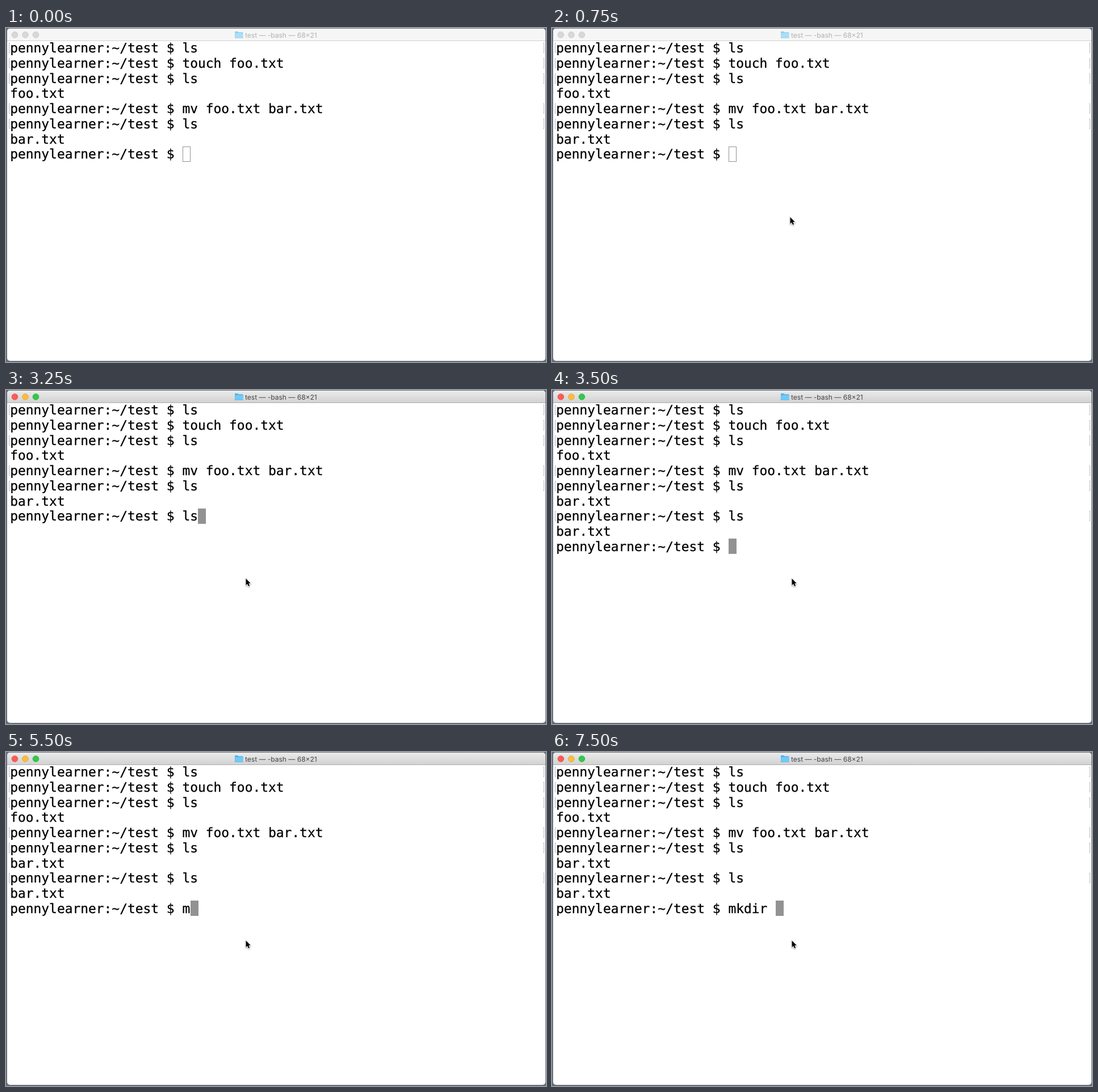
Animation of 951 by 589 pixels, one loop 8 s. Source, as an HTML page:

```html
<!DOCTYPE html>
<html>
<head>
<meta charset="utf-8">
<style>
  html, body { margin: 0; width: 100%; height: 100%; overflow: hidden; background: #636d7d; }
  svg { display: block; }
  text { white-space: pre; text-rendering: geometricPrecision; }
  .term text { font: 22.9px "DejaVu Sans Mono", monospace; stroke: #000; stroke-width: .3px; }
  .title { font: 12px Inter, sans-serif; }
  .bracket { fill: none; stroke: #b4b4b4; }
</style>
</head>
<body>
<svg width="951" height="589" viewBox="0 0 951 589">
  <defs>
    <linearGradient id="bar" x2="0" y2="1">
      <stop stop-color="#ebebeb"/><stop offset="1" stop-color="#d2d2d2"/>
    </linearGradient>
    <clipPath id="frame"><rect x="2" y="1" width="948" height="586" rx="5"/></clipPath>
  </defs>
  <g clip-path="url(#frame)">
    <rect width="951" height="589" fill="#fff"/>
    <g id="header"></g>
    <g id="term" class="term"></g>
  </g>
  <path id="mouse" d="M0 0V11.8L2.7 9.4L4.5 13.6L6.6 12.7L4.8 8.6H8.3Z"
    stroke="#fff" stroke-width="1.6" paint-order="stroke" style="filter:drop-shadow(0 1px .8px #0006)"/>
</svg>
<script>
const LOOP = 8000, COL = 13.787, ROW = 26.7;
const PROMPT = 'pennylearner:~/test $ ';
const HISTORY = ['$ls', '$touch foo.txt', '$ls', 'foo.txt', '$mv foo.txt bar.txt', '$ls', 'bar.txt'];
const MORE = [...HISTORY, '$ls', 'bar.txt'];

// start time, finished lines, typed command
const TYPING = [
  [0, HISTORY, ''], [3250, HISTORY, 'ls'], [3500, MORE, ''], [5000, MORE, 'k'], [5250, MORE, ''],
  [5500, MORE, 'm'], [5750, MORE, 'mkd'], [6000, MORE, 'mkdi'], [6250, MORE, 'mkdir ']
];
// start time, pointer tip
const POINTER = [[0, -50, -50], [500, 454.5, 313.5], [750, 419.5, 333.5], [1000, 422.5, 332.5]];
const FOCUS = [[0, false], [1000, true]];

const $ = id => document.getElementById(id);
const at = (steps, t) => steps.findLast(s => s[0] <= t);

function header(active) {
  const lights = active ? ['#fc5b57', '#fdbc40', '#34c84a'] : ['#d8d8d8', '#d8d8d8', '#d8d8d8'];
  const rims = active ? ['#e2463f', '#dfa023', '#24aa35'] : ['#c3c3c3', '#c3c3c3', '#c3c3c3'];
  const [folder, tab] = active ? ['#70caf8', '#50b2e6'] : ['#a9dff6', '#92cfea'];
  return `<rect y="1" width="951" height="21" fill="${active ? 'url(#bar)' : '#f6f6f6'}"/>
    <rect y="22" width="951" height="1" fill="${active ? '#adadad' : '#cfcfcf'}"/>` +
    lights.map((c, i) =>
      `<circle cx="${15.5 + 18.5 * i}" cy="12" r="5.3" fill="${c}" stroke="${rims[i]}" stroke-width=".8"/>`).join('') +
    `<path d="M403 18V7q0-1 1-1h4l1.5 1.5H416.500q1 0 1 1V18Z" fill="${tab}"/>
    <rect x="403.500" y="9" width="13.500" height="8.500" fill="${folder}"/>
    <text class="title" x="421" y="16.500" fill="${active ? '#444' : '#b0b0b0'}">test — -bash — 68×21</text>`;
}

function line(s, i) {
  const y = Math.round(43.3 + ROW * i);
  const top = y - 16.5;
  const brackets = s[0] === '$'
    ? `<path class="bracket" d="M7 ${top}H5.5v17H7M946 ${top}h1.5v17H946"/>` : '';
  return brackets + `<text x="7.2" y="${y}">${s.replace(/^[$>]/, PROMPT.replace('$', '$$$$'))}</text>`;
}

function terminal(lines, typed, active) {
  const x = Math.round(310.9 + COL * typed.length);
  const y = Math.round(22.1 + ROW * lines.length);
  const caret = active
    ? `<rect x="${x}" y="${y}" width="14" height="27" fill="#929292"/>`
    : `<rect x="${x + .5}" y="${y + .5}" width="13" height="26" fill="none" stroke="#929292"/>`;
  return [...lines, '>' + typed].map(line).join('') + caret;
}

let shown;
function draw() {
  const t = performance.now() % LOOP;
  const [, active] = at(FOCUS, t), typing = at(TYPING, t), [, x, y] = at(POINTER, t);
  $('mouse').setAttribute('transform', `translate(${x} ${y})`);
  const key = typing[0] + ' ' + active;
  if (key !== shown) {
    shown = key;
    $('header').innerHTML = header(active);
    $('term').innerHTML = terminal(typing[1], typing[2], active);
  }
  requestAnimationFrame(draw);
}
draw();
</script>
</body>
</html>
```
